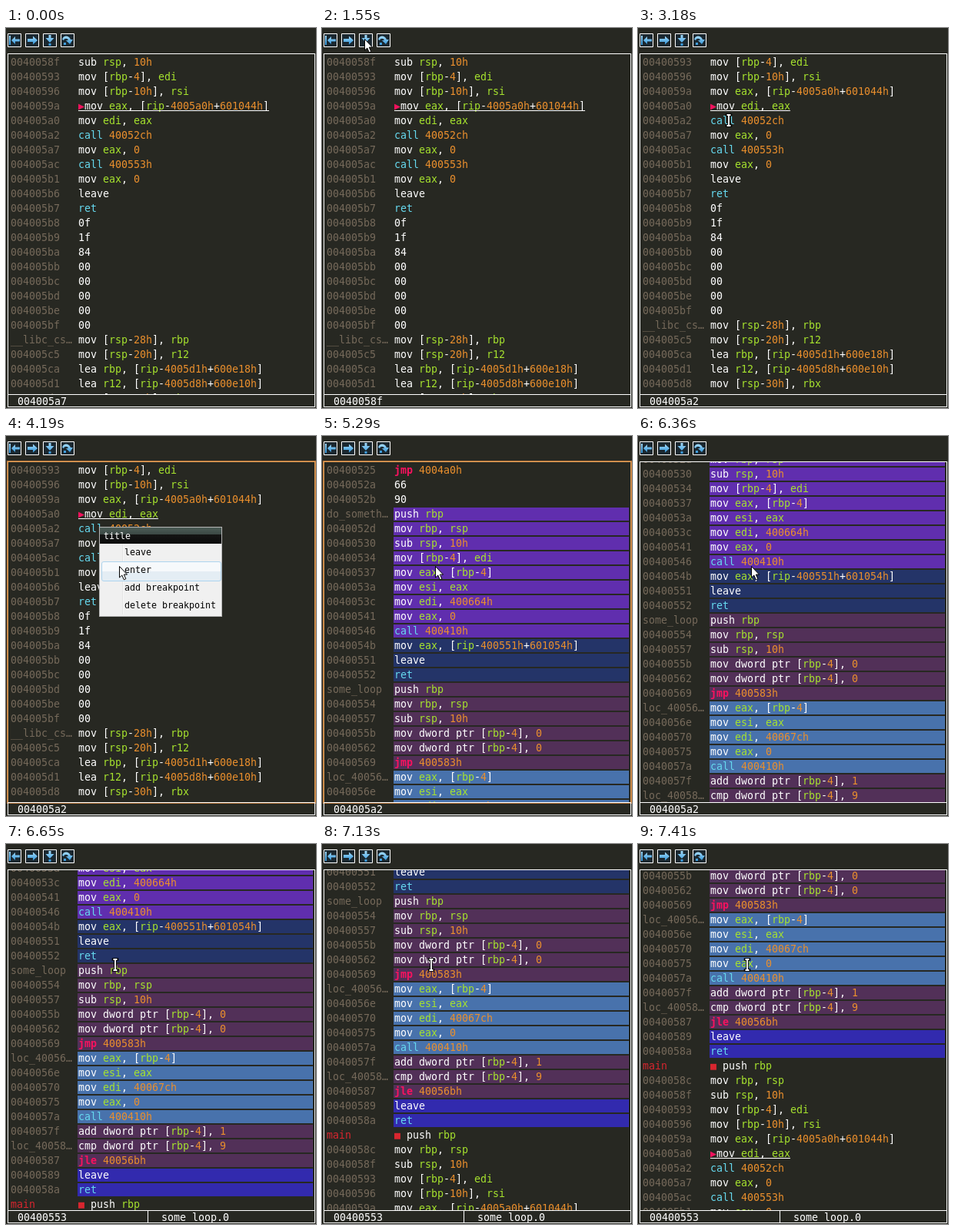
These frames come from a looping animation (403x494 px, 8 s). An HTML page:

```html
<!DOCTYPE html>
<html lang="en">
<head>
<meta charset="utf-8">
<title>Disassembly view</title>
<style>
html, body { margin: 0; width: 100%; height: 100%; overflow: hidden; background: #272822; }
body { position: relative; font: 13.29px/18px "DejaVu Sans Mono", monospace; color: #fff; white-space: pre; }
body * { box-sizing: border-box; }
svg, .panel, .status, .menu, .cursor, .cursor * { position: absolute; }
.tools { left: 0; top: 0; }

/* every timeline is one 8 s loop: 1% = 80 ms */
.list, .panel, .menu, .hover::before, .mark, .strip, .extra, .arrow, .beam {
  animation: 8s step-end infinite;
}

.panel { left: 2px; top: 33px; width: 400px; height: 444px; border: 1px solid #fff; overflow: hidden; animation-name: focus; }
.list { padding-top: 2px; animation-name: scroll; }
.row { position: relative; height: 17px; margin-bottom: 2px; padding-left: 3px; color: #75695a; }
.code { position: absolute; left: 90px; top: 0; width: 306px; height: 17px; padding-left: 1px; color: #fff; }
.purple { background: #602eae; }
.navy { background: #243468; }
.plum { background: #523058; }
.blue { background: #4872ac; }
.indigo { background: #322aae; }
.reg { color: #a6e22e; }
.num { color: #ea8f2d; }
.flow { color: #66d9ef; }
.jump { color: #f9125f; font-weight: bold; }
.stop { color: #d8262f; }

.mark { --on: 0; position: relative; display: inline-block; height: 17px; padding-left: calc(8px * var(--on)); }
.mark::before { content: "▶"; position: absolute; left: 0; color: #f0125c; opacity: var(--on); }
.mark::after { content: ""; position: absolute; left: 0; right: 0; top: 14px; height: 1px; background: #fff; opacity: var(--on); }
.first { animation-name: first; }
.second { animation-name: second; }

.status { left: 2px; top: 476px; width: 400px; height: 17px; border: 1px solid #fff; overflow: hidden; }
.strip { padding-left: 12px; animation-name: hovered; }
.strip div { height: 16px; }
.extra { position: absolute; left: 181px; top: 0; height: 16px; padding-left: 17px; border-left: 1px solid #fff; animation-name: extra; }

.menu { z-index: 1; left: 121px; top: 118px; width: 160px; height: 117px; border: 1px solid #b4b4b4; background: #f0f0f0; color: #000;
  font-size: 11.63px; line-height: 23px; animation-name: menu; }
.title { height: 21px; padding-left: 5px; line-height: 22px; color: #fff; background: linear-gradient(#4b5c56, #3c4945 42%, #141514 44%, #0c0c0c); }
.item { position: relative; height: 23px; padding-left: 32px; }
.item::after { content: ""; position: absolute; left: 29px; top: 0; width: 2px; height: 23px; background: linear-gradient(90deg, #e4e4e4 50%, #f8f8f8 50%); }
.item span { position: relative; z-index: 2; }
.hover::before { content: ""; position: absolute; z-index: 1; left: 2px; top: 0; width: 154px; height: 24px;
  border: 1px solid #aed4ee; border-radius: 3px; background: linear-gradient(#f6f9fb 0 48%, #e4edf4 52%); }
.leave::before { animation-name: leave; }
.enter::before { animation-name: enter; }

.cursor { z-index: 2; left: 0; top: 0; animation: move 8s linear infinite; }
.cursor svg { overflow: visible; left: 0; top: 0; width: 1px; height: 1px; }
.arrow { animation-name: arrow; }
.beam { animation-name: beam; fill: none; }

@keyframes scroll {
  0% { transform: translateY(-627px); }
  23.25% { transform: translateY(-646px); }
  65% { transform: translateY(0); }
  78.5% { transform: translateY(-30px); }
  79% { transform: translateY(-60px); }
  79.5% { transform: translateY(-90px); }
  80% { transform: translateY(-120px); }
  80.5% { transform: translateY(-150px); }
  81.125% { transform: translateY(-165px); }
  87.25% { transform: translateY(-195px); }
  88.125% { transform: translateY(-225px); }
  89.125% { transform: translateY(-255px); }
  90% { transform: translateY(-285px); }
  90.875% { transform: translateY(-315px); }
  92.625%, 100% { transform: translateY(-345px); }
}
@keyframes first { 0% { --on: 1; } 23.25%, 100% { --on: 0; } }
@keyframes second { 0% { --on: 0; } 23.25%, 100% { --on: 1; } }
@keyframes focus {
  0% { outline: 0 solid transparent; border-color: #fff; }
  42.25% { outline: 1px solid #b0723a; border-color: #eca75c; }
  66.75%, 100% { outline: 0 solid transparent; border-color: #fff; }
}
@keyframes menu { 0% { visibility: hidden; } 43.625% { visibility: visible; } 64.125%, 100% { visibility: hidden; } }
@keyframes leave { 0% { opacity: 0; } 49.625% { opacity: 1; } 51.125%, 100% { opacity: 0; } }
@keyframes enter { 0% { opacity: 0; } 51.125%, 100% { opacity: 1; } }
@keyframes hovered {
  0% { transform: translateY(0); }
  9.125% { transform: translateY(-16px); }
  9.6875% { transform: translateY(-32px); }
  10.25% { transform: translateY(-48px); }
  10.75% { transform: translateY(-64px); }
  33.5% { transform: translateY(-80px); }
  34.625% { transform: translateY(-96px); }
  35.75% { transform: translateY(-112px); }
  36.875% { transform: translateY(-128px); }
  38.25% { transform: translateY(-144px); }
  82.625%, 100% { transform: translateY(-160px); }
}
@keyframes extra { 0% { visibility: hidden; } 82.625%, 100% { visibility: visible; } }
@keyframes move {
  0%, 9.125% { transform: translate(316px, 140px); animation-timing-function: step-end; }
  9.6875% { transform: translate(315px, 110px); animation-timing-function: step-end; }
  10.25% { transform: translate(313px, 84px); animation-timing-function: step-end; }
  13.75% { transform: translate(103px, 0); animation-timing-function: ease-out; }
  19.375%, 22% { transform: translate(55px, 14px); }
  22.75%, 30.875% { transform: translate(56px, 13px); animation-timing-function: ease-in-out; }
  39.75%, 47.375% { transform: translate(118px, 120px); animation-timing-function: ease-in-out; }
  52.375%, 81.5% { transform: translate(147px, 169px); }
  83.125%, 100% { transform: translate(142px, 157px); }
}
@keyframes arrow {
  0% { visibility: hidden; }
  13.75% { visibility: visible; }
  33.5% { visibility: hidden; }
  48.25% { visibility: visible; }
  81.5%, 100% { visibility: hidden; }
}
@keyframes beam {
  0% { visibility: hidden; }
  9.125% { visibility: visible; }
  10.75% { visibility: hidden; }
  33.5% { visibility: visible; }
  48.25% { visibility: hidden; }
  81.5%, 100% { visibility: visible; }
}
</style>
</head>
<body><svg class="tools" width="92" height="32">
  <defs><linearGradient id="sky" x2="0" y2="1"><stop stop-color="#a5dcfa"/><stop offset="1" stop-color="#2f93d8"/></linearGradient></defs>
  <path d="M2.5 7.5h17v17h-17zM25.5 7.5h17v17h-17zM48.5 7.5h17v17h-17zM71.5 7.5h17v17h-17z" fill="#1b2830" stroke="#fff"/>
  <g fill="url(#sky)">
    <path d="M4 10h2v12h-2zM7 16l5-5v3.5h6v3h-6v3.5z"/>
    <path d="M41 16l-6-5.5v3.5h-7v4h7v3.5z"/>
    <path d="M55.500 9h3v4h4l-5.500 6-5.500-6h4zM55.500 20h3v3h-3z"/>
    <path d="M73 15c1-6 9-6 11 0h3l-4 6-5-5h3c-1-3-5-3-6 0zM75 19h3v3h-3z"/>
  </g>
</svg><div class="panel"><div class="list"></div></div><div class="status"><div class="strip"></div><div class="extra">some_loop.0</div></div><div class="menu"><div class="title">title</div><div class="item hover leave"><span>leave</span></div><div class="item hover enter"><span>enter</span></div><div class="item"><span>add breakpoint</span></div><div class="item"><span>delete breakpoint</span></div></div><div class="cursor"><svg class="arrow"><path d="M.5 .5v14.500l3.300-3 2.500 5.800 2.500-1.100-2.500-5.600h4.200z" fill="#fff" stroke="#000"/></svg><svg class="beam"><defs><path id="bar" d="M-2.500 -7h5M0 -7v14M-2.500 7h5"/></defs><use href="#bar" stroke="#000" stroke-width="3.500" stroke-linecap="square"/><use href="#bar" stroke="#fff" stroke-width="1.800"/></svg></div><script>
// address|instruction; a "#name" line sets the block colour for the rows after it
const listing = `525|jmp 4004a0h
52a|66
52b|90
#purple
do_someth…|push rbp
52d|mov rbp, rsp
530|sub rsp, 10h
534|mov [rbp-4], edi
537|mov eax, [rbp-4]
53a|mov esi, eax
53c|mov edi, 400664h
541|mov eax, 0
546|call 400410h
#navy
54b|mov eax, [rip-400551h+601054h]
551|leave
552|ret
#plum
some_loop|push rbp
554|mov rbp, rsp
557|sub rsp, 10h
55b|mov dword ptr [rbp-4], 0
562|mov dword ptr [rbp-4], 0
569|jmp 400583h
#blue
loc_40056…|mov eax, [rbp-4]
56e|mov esi, eax
570|mov edi, 40067ch
575|mov eax, 0
57a|call 400410h
#plum
57f|add dword ptr [rbp-4], 1
loc_40058…|cmp dword ptr [rbp-4], 9
587|jle 40056bh
#indigo
589|leave
58a|ret
#
main|■ push rbp
58c|mov rbp, rsp
58f|sub rsp, 10h
593|mov [rbp-4], edi
596|mov [rbp-10h], rsi
59a|mov eax, [rip-4005a0h+601044h]
5a0|mov edi, eax
5a2|call 40052ch
5a7|mov eax, 0
5ac|call 400553h
5b1|mov eax, 0
5b6|leave
5b7|ret
5b8|0f
5b9|1f
5ba|84
5bb|00
5bc|00
5bd|00
5be|00
5bf|00
__libc_cs…|mov [rsp-28h], rbp
5c5|mov [rsp-20h], r12
5ca|lea rbp, [rip-4005d1h+600e18h]
5d1|lea r12, [rip-4005d8h+600e10h]
5d8|mov [rsp-30h], rbx`;

const tokens = /\b(r(?:bp|sp|ip|si|bx|12)|e(?:ax|di|si))\b|\b([\da-f]+h|\d)\b|\b(call|ret)\b|\b(jmp|jle)\b|(■)/g;
const kinds = ["reg", "num", "flow", "jump", "stop"];
const paint = code => code.replace(tokens, (word, ...groups) =>
  `<span class="${kinds[groups.findIndex((g, i) => i < 5 && g)]}">${word}</span>`);
const full = addr => addr.length === 3 ? "00400" + addr : addr;
const marks = { "59a": "first", "5a0": "second" };

let block = "", html = "";
for (const line of listing.split("\n")) {
  if (line[0] === "#") { block = line.slice(1); continue; }
  const [addr, code] = line.split("|");
  const label = addr === "main" ? `<span class="stop">main</span>` : full(addr);
  const text = marks[addr] ? `<span class="mark ${marks[addr]}">${paint(code)}</span>` : paint(code);
  html += `<div class="row">${label}<div class="code ${block}">${text}</div></div>`;
}
document.querySelector(".list").innerHTML = html;
document.querySelector(".strip").innerHTML =
  "5a7 5a2 59a 596 58f 593 596 59a 5a0 5a2 553".split(" ").map(a => `<div>${full(a)}</div>`).join("");
</script></body>
</html>
```
